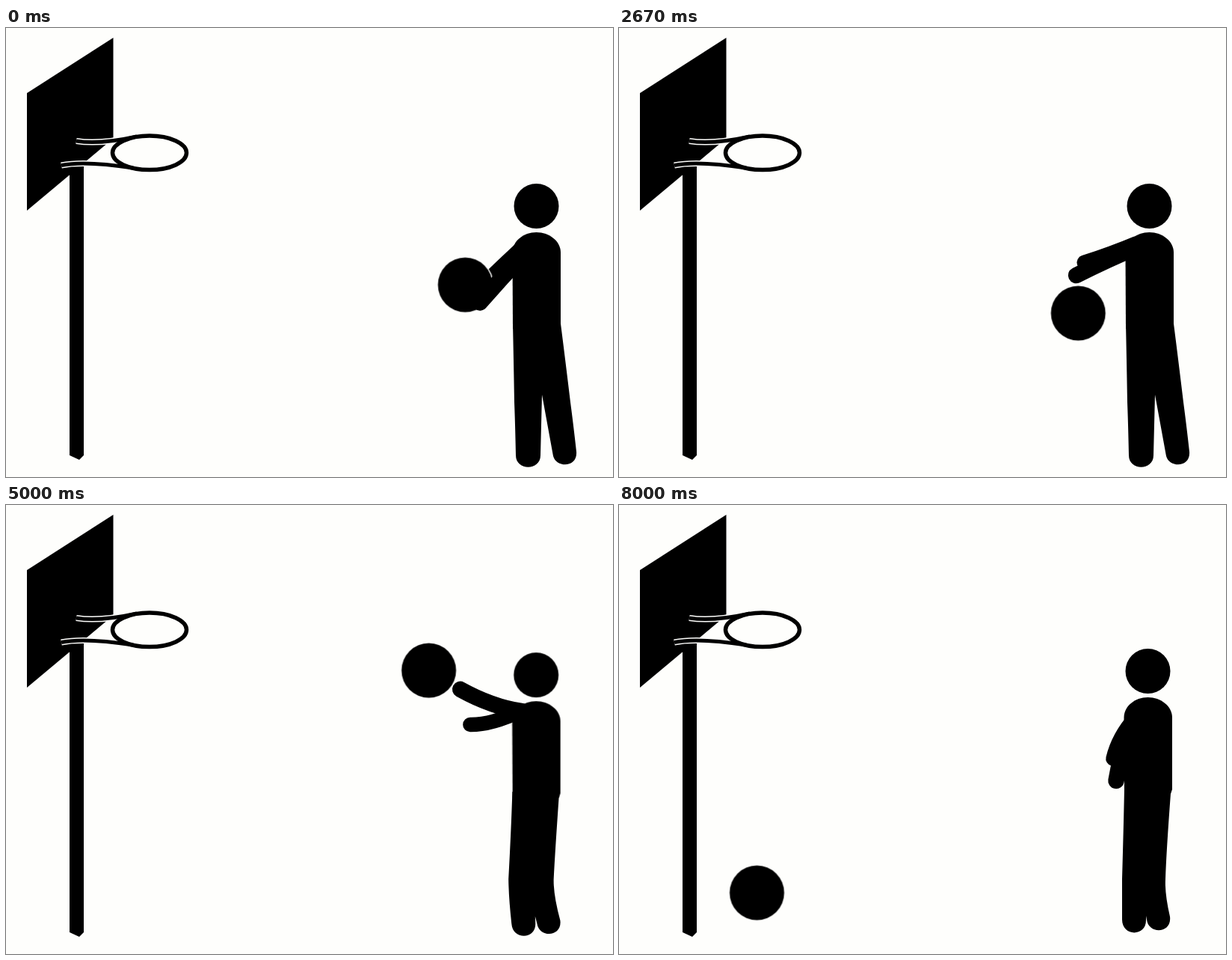
These frames come from a looping animation (812x600 px, 10000 ms). An HTML page:

```html
<!DOCTYPE html>
<html lang="en">
<head>
<meta charset="utf-8">
<title>Free throw</title>
<style>
  :root { --paper: #fefefc; }
  html, body { margin: 0; width: 100%; height: 100%; overflow: hidden; background: var(--paper); }
  svg { display: block; width: 812px; height: 600px; }
  .move { animation: 10s linear infinite; }
  .limb { fill: none; stroke: #000; stroke-linecap: round; }
  .rail { fill: none; stroke: #000; stroke-width: 5; }
  .edge { fill: none; stroke: var(--paper); stroke-width: 8; }

  /* ball: horizontal and vertical motion are separate */
  #ballX { animation-name: ballX; }
  #ballY { animation-name: ballY; }
  @keyframes ballX {
    0%, 43.3% { transform: translateX(614.3px); }
    44.2% { transform: translateX(611.3px); }
    46.6% { transform: translateX(611.3px); animation-timing-function: cubic-bezier(.4, 0, .7, .42); }
    53.3% { transform: translateX(430px); }
    55.8% { transform: translateX(295.5px); animation-timing-function: cubic-bezier(.2, .8, .4, 1); }
    63.8%, 100% { transform: translateX(184.5px); }
  }
  @keyframes ballY {
    0%, .5%, 8.65%, 16.81%, 24.97%, 33.22% {
      transform: translateY(343.2px); animation-timing-function: cubic-bezier(.333, 0, .667, .333);
    }
    4.57%, 12.73%, 20.89%, 29.05%, 37.1% {
      transform: translateY(552px); animation-timing-function: cubic-bezier(.333, .667, .667, 1);
    }
    40%, 43.3% { transform: translateY(343.2px); }
    44.2% { transform: translateY(348.5px); }
    46.6% { transform: translateY(348.5px); animation-timing-function: cubic-bezier(.4, .1, .6, 1); }
    54% { transform: translateY(80.5px); animation-timing-function: cubic-bezier(.333, 0, .667, .333); }
    55.8% { transform: translateY(91.3px); animation-timing-function: cubic-bezier(.25, .3, .4, 1); }
    64% { transform: translateY(190px); animation-timing-function: cubic-bezier(.333, 0, .667, .333); }
    68.5%, 73%, 75.25%, 76.375% {
      transform: translateY(518.2px); animation-timing-function: cubic-bezier(.333, .667, .667, 1);
    }
    70.75% { transform: translateY(436px); animation-timing-function: cubic-bezier(.333, 0, .667, .333); }
    74.125% { transform: translateY(497.6px); animation-timing-function: cubic-bezier(.333, 0, .667, .333); }
    75.812% { transform: translateY(513px); animation-timing-function: cubic-bezier(.333, 0, .667, .333); }
    76.65% { transform: translateY(517px); animation-timing-function: cubic-bezier(.333, 0, .667, .333); }
    76.95%, 100% { transform: translateY(518.2px); }
  }

  /* body: stand, crouch, jump */
  #trunk { animation-name: trunk; }
  @keyframes trunk {
    0%, 39.95% { transform: none; }
    40%, 46.5% { transform: translate(4px, 3px); animation-timing-function: ease-in-out; }
    52%, 100% { transform: translate(-2px, -16px); }
  }
  #legs {
    --stand: path("M678 395Q679 440 680 500Q681 525 682 571C682 592 715 592 715 571L717 490L732 572C736 588 765 588 763 566Q759 530 755 500Q749 450 742 395Z");
    --crouch: path("M681 395Q678 440 670 500Q671 525 685 574C690 593 719 592 717 570L714 551L722 573C727 592 757 590 753 568Q738 525 737 500Q741 460 744.5 395Z");
    --jump: path("M676 379Q675 430 673 500Q673 525 673 554C673 577 705 577 705 555L705.5 549L706 554C708 574 740 573 737 550Q730 520 731 500Q732 465 738.5 379Z");
    d: var(--stand);
    animation-name: legs;
  }
  @keyframes legs {
    0%, 39.95% { d: var(--stand); }
    40%, 46.5% { d: var(--crouch); animation-timing-function: ease-in-out; }
    52%, 100% { d: var(--jump); }
  }

  /* both arms share one timeline and differ in their poses */
  #back {
    --hold: path("M692 292Q662 320 634 347");
    --up: path("M692 286Q660 287 620 288");
    --push: path("M692 287Q660 299 620 310");
    --low: path("M688 297Q665 320 643.5 345");
    --aim: path("M692 303Q668 328 646 350");
    --shoot: path("M688 272Q647 290 618 287");
    --rest: path("M690 285Q668 310 661 339");
    stroke-width: 19.5px;
  }
  #front {
    --hold: path("M692 303Q663 334 634 367");
    --up: path("M692 291Q650 293 606 297");
    --push: path("M692 292Q655 306 606 325");
    --low: path("M690 308Q667 330 663.5 382");
    --aim: path("M694 299Q650 328 609 309.5");
    --shoot: path("M690 273Q650 263 607.5 239");
    --rest: path("M688 290Q672 325 665 368.5");
    stroke-width: 21.5px;
  }
  .limb { d: var(--hold); animation-name: arm; }
  @keyframes arm {
    0%, .5% { d: var(--hold); }
    4.57%, 12.73%, 20.89%, 29.05%, 35.5% { d: var(--low); }
    8.65%, 16.81%, 24.97% { d: var(--up); }
    10.14%, 18.3%, 26.46% { d: var(--push); }
    40%, 43.3% { d: var(--hold); }
    44.2%, 46.6% { d: var(--aim); animation-timing-function: ease-in-out; }
    51%, 55.8% { d: var(--shoot); animation-timing-function: ease-in-out; }
    63.8%, 100% { d: var(--rest); }
  }
</style>
</head>
<body>
<svg viewBox="0 0 812 600">
  <g id="hoop">
    <path d="M28 87L143.5 13V147.5L28 244Z"/>
    <path d="M85 180H104V571L98 577L85 571Z"/>
    <path class="edge" d="M94 151Q125 156 175 145M74 183.5Q105 177 170 187"/>
    <path class="rail" d="M94 151Q125 156 175 145M74 183.5Q105 177 170 187"/>
    <ellipse cx="192" cy="166.8" rx="49.5" ry="22.8" fill="none" stroke="#000" stroke-width="5.5"/>
  </g>
  <path id="legs" class="move"/>
  <g id="trunk" class="move">
    <circle cx="709.5" cy="238" r="30"/>
    <path d="M677.5 300C677.5 285 692 273 709.5 273S742 285 742 300V396L740 402H678Z"/>
  </g>
  <path id="back" class="limb move"/>
  <g id="ballX" class="move">
    <g id="ballY" class="move">
      <circle r="38" fill="var(--paper)"/>
      <circle r="36.5"/>
    </g>
  </g>
  <path id="front" class="limb move"/>
</svg>
</body>
</html>
```
